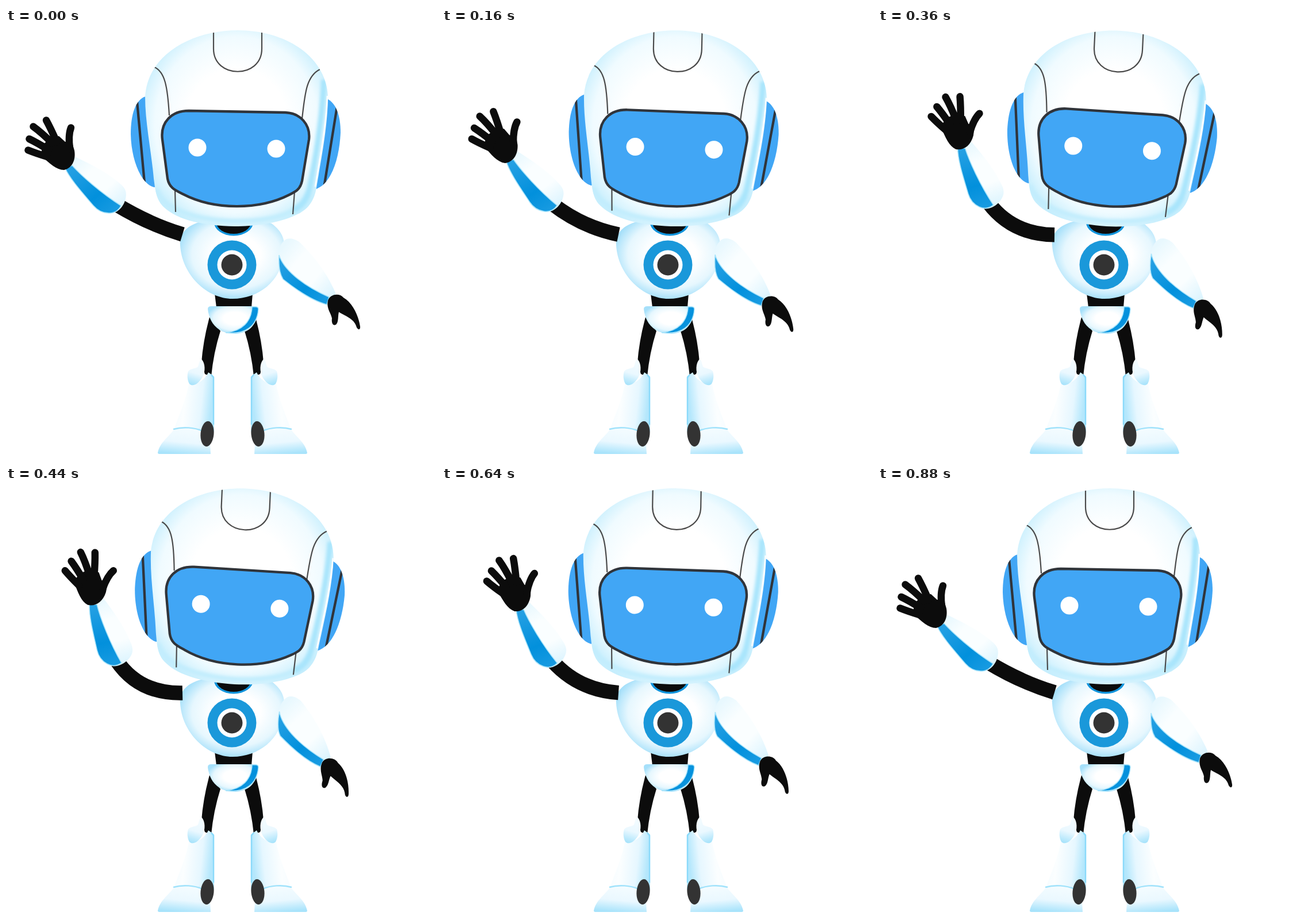
Recreate the animation shown at these times as an HTML page. Size 748 px wide and 748 px high, loop 0.92 s.

```html
<!DOCTYPE html>
<html lang="en">
<head>
<meta charset="utf-8">
<title>Waving robot</title>
<style>
  html, body { margin: 0; width: 100%; height: 100%; overflow: hidden; background: #fff; }
  svg { display: block; width: 100%; height: 100%; }
  .black { fill: #0c0c0c; }
  .sky { fill: #41a6f5; }
  .trim { fill: url(#trim); stroke: #a8e4fb; stroke-width: 1.5; }
  .line { fill: none; stroke: #4a4a4a; stroke-width: 2.2; }
  .bar { stroke: #30343a; stroke-width: 4.3; }
  .finger { fill: none; stroke: #0c0c0c; stroke-width: 12.5; stroke-linecap: round; }
</style>
</head>
<body>
<svg viewBox="0 0 748 748">
  <defs>
    <radialGradient id="shell" cx=".5" cy=".48" r=".56">
      <stop offset=".5" stop-color="#fff"/><stop offset=".8" stop-color="#f0fbff"/><stop offset="1" stop-color="#c6eefd"/>
    </radialGradient>
    <radialGradient id="chest" cx=".54" cy=".44" r=".57">
      <stop offset=".4" stop-color="#fff"/><stop offset=".75" stop-color="#e6f7fe"/><stop offset="1" stop-color="#a6e0fa"/>
    </radialGradient>
    <linearGradient id="shin" x2="1" y2=".15">
      <stop offset="0" stop-color="#f3fbff"/><stop offset=".35" stop-color="#fbfeff"/><stop offset=".75" stop-color="#e6f7ff"/><stop offset="1" stop-color="#b4e7fc"/>
    </linearGradient>
    <linearGradient id="soft" x1=".6" y1="0" x2=".4" y2="1">
      <stop offset="0" stop-color="#f4fcff"/><stop offset=".55" stop-color="#eaf8ff"/><stop offset="1" stop-color="#a8e3fb"/>
    </linearGradient>
    <linearGradient id="sleeve" x1=".1" y1=".1" x2=".9" y2=".9">
      <stop offset="0" stop-color="#e8f8fe"/><stop offset=".3" stop-color="#fafeff"/><stop offset=".65" stop-color="#fafeff"/><stop offset="1" stop-color="#dcf4fe"/>
    </linearGradient>
    <linearGradient id="trim" x2="1" y2="1">
      <stop offset="0" stop-color="#2aa2e4"/><stop offset=".6" stop-color="#0290dc"/><stop offset="1" stop-color="#1d9de2"/>
    </linearGradient>
    <filter id="blur" x="-20%" y="-20%" width="140%" height="140%"><feGaussianBlur stdDeviation="2.5"/></filter>
    <path id="helmet" d="M242 120C246 45 325 4 403 4C485 4 556 48 560 118C560 170 548 230 541 272C537 302 525 318 498 328C470 340 430 345 398 345C345 344 300 335 275 312C262 300 260 285 257 262C253 215 242 165 242 120Z"/>
    <clipPath id="helmetClip"><use href="#helmet"/></clipPath>
    <path id="earL" d="M243 119C225 125 217 150 217 185C218 230 235 272 258 277L275 270L260 119Z"/>
    <path id="earR" d="M558 123C574 130 582 152 582 182C580 225 567 272 537 281L525 270L545 123Z"/>
    <clipPath id="earClip"><use href="#earL"/><use href="#earR"/></clipPath>
    <g id="leg">
      <path class="black" d="M354 503Q343 543 340 582L346 602L357 606Q361 565 373 527Z"/>
      <path fill="url(#shin)" d="M318 619C332 622 346 612 352 599L362 606V702H291C296 685 311 655 318 619Z"/>
      <path d="M357 603L361 608V690" fill="none" stroke="#8bdafa" stroke-width="2.5"/>
      <path fill="url(#soft)" d="M340 576C347 583 347 598 342 607C335 619 325 625 319 619C315 612 315 603 317 597C323 591 331 593 334 589C336 584 336 578 340 576Z"/>
      <path fill="url(#soft)" d="M264 739C267 722 282 712 291 700C308 693 338 696 354 706L356 741H268Q264 741 264 739Z"/>
      <path d="M291 698C308 693 328 695 342 701" fill="none" stroke="#a0e2fb" stroke-width="2.5"/>
      <ellipse cx="350" cy="706" rx="11.5" ry="22" fill="#333" transform="rotate(5 350 706)"/>
    </g>
  </defs>

  <use href="#leg"/>
  <use href="#leg" transform="matrix(-1 0 0 1 788 0)"/>

  <path class="black" d="M363 462H429L427 486H366Z"/>
  <path fill="url(#chest)" d="M351 489Q351 484 357 484H433Q439 484 439 489C437 519 420 532 396 532C370 531 354 515 351 489Z"/>
  <path class="trim" stroke="none" d="M428 485H434Q439 485 439 489C437 518 417 534 382 530C411 527 427 511 428 485Z"/>

  <path fill="url(#chest)" d="M335 338C312 346 302 358 303 378C306 430 350 471 394 471C440 471 478 440 483 395C487 370 482 355 462 340C440 332 355 332 335 338Z"/>
  <ellipse cx="396" cy="338" rx="34" ry="23.500" fill="#1294dc"/>
  <ellipse cx="396" cy="338" rx="30" ry="20" class="black"/>
  <circle cx="393" cy="412" r="42.500" fill="#1a98da"/>
  <circle cx="393" cy="412" r="25.500" fill="#fff"/>
  <circle cx="393" cy="412" r="18.500" fill="#333"/>

  <path id="upperArm" fill="none" stroke="#0c0c0c" stroke-width="25.500"/>
  <g id="waveArm">
    <path fill="url(#sleeve)" d="M103 245C112 264 136 290 152 309C160 318 170 323 181 323C195 322 205 310 208 297C210 287 209 280 200 272C177 252 150 238 120 224Z"/>
    <path class="trim" d="M103 244L115 239C130 256 165 287 200 309C195 319 188 322 179 322C167 322 158 316 152 309C136 290 112 264 103 244Z"/>
    <path class="black" d="M61 222C76 236 88 247 101 247C114 244 122 231 119 213L114 196L103 198L92 188L76 191L63 205Z"/>
    <path class="finger" d="M70 160.500Q78 175 88 198M47.500 171.500Q62 182 80 200M40.500 193Q55 200 74 212M38.500 212.500Q52 218 72 224M113 173.500Q108 186 111 210"/>
  </g>

  <g id="restArm">
    <path fill="url(#sleeve)" d="M488 367C478 372 474 385 474 398C475 420 476 434 484 440C510 458 535 475 558 482C563 475 567 468 574 463C565 440 545 405 510 372Q498 364 488 367Z"/>
    <path class="trim" d="M475 395C482 418 512 446 562 468L558 481C535 475 507 457 482 437C476 428 474 415 475 395Z"/>
    <path id="restHand" class="black" d="M560 474C564 462 581 461 587 469C603 478 613 500 616 519C617 526 611 526 609 518C604 505 590 501 579 494C577 502 579 511 574 516C568 519 566 512 567 505C565 495 557 488 560 474Z"/>
  </g>

  <g id="head">
    <use href="#earL" class="sky"/>
    <use href="#earR" class="sky"/>
    <path class="bar" clip-path="url(#earClip)" d="M228 128L241 270M577 130L553 278"/>
    <use href="#helmet" fill="url(#shell)"/>
    <g clip-path="url(#helmetClip)" fill="none">
      <path d="M262 280C272 316 330 334 398 336C470 336 515 320 527 288" stroke="#c2edfd" stroke-width="8" filter="url(#blur)"/>
      <path d="M553 90C551 160 537 235 528 280C523 300 513 311 500 317" stroke="#a9e5fc" stroke-width="10" filter="url(#blur)"/>
      <path d="M559 118C557 175 545 232 538 276" stroke="#fff" stroke-width="2.5"/>
      <path class="line" d="M361 6V36C361 89 445 89 445 36V8M258 68C276 76 281 100 284 152M546 72C522 84 520 115 515 158M294 282L295 320M502 284L499 324"/>
    </g>
    <path class="sky bar" d="M318 144L486 147C512 148 530 168 527 194L515 266C512 281 503 285 493 290C440 317 362 317 308 289C294 282 284 278 281 262L272 194C268 164 288 144 318 144Z"/>
    <circle cx="333" cy="208" r="15.500" fill="#fff"/>
    <circle cx="470" cy="210" r="15.500" fill="#fff"/>
  </g>
</svg>
<script>
  const LOOP = 920, STEP = 40;
  const part = id => document.getElementById(id);
  const turn = (id, angle, x, y) => part(id).setAttribute('transform', `rotate(${angle} ${x} ${y})`);
  const ease = p => (1 - Math.cos(Math.PI * Math.min(1, Math.max(0, p)))) / 2;
  // Rises from 0 to 1 at the peak, then falls back to 0 at the end
  const swing = (t, peak, end) => t < peak ? ease(t / peak) : ease((end - t) / (end - peak));

  function draw(now) {
    const t = Math.floor(now % LOOP / STEP) * STEP;
    const nod = swing(t, 340, 840), wave = swing(t, 480, 880);
    turn('head', 2.8 * nod, 398, 345);
    turn('waveArm', 28.2 * wave, 203, 310);
    turn('restArm', 7.5 * wave, 496, 398);
    turn('restHand', 4 * wave, 568, 475);
    part('upperArm').setAttribute('d', `M192 ${307 - 4 * wave}Q${248 - 17 * wave} ${341 + 21 * wave} 307 ${359 + wave}`);
  }

  const start = performance.now();
  function tick() {
    draw(performance.now() - start);
    requestAnimationFrame(tick);
  }
  tick();
</script>
</body>
</html>
```
